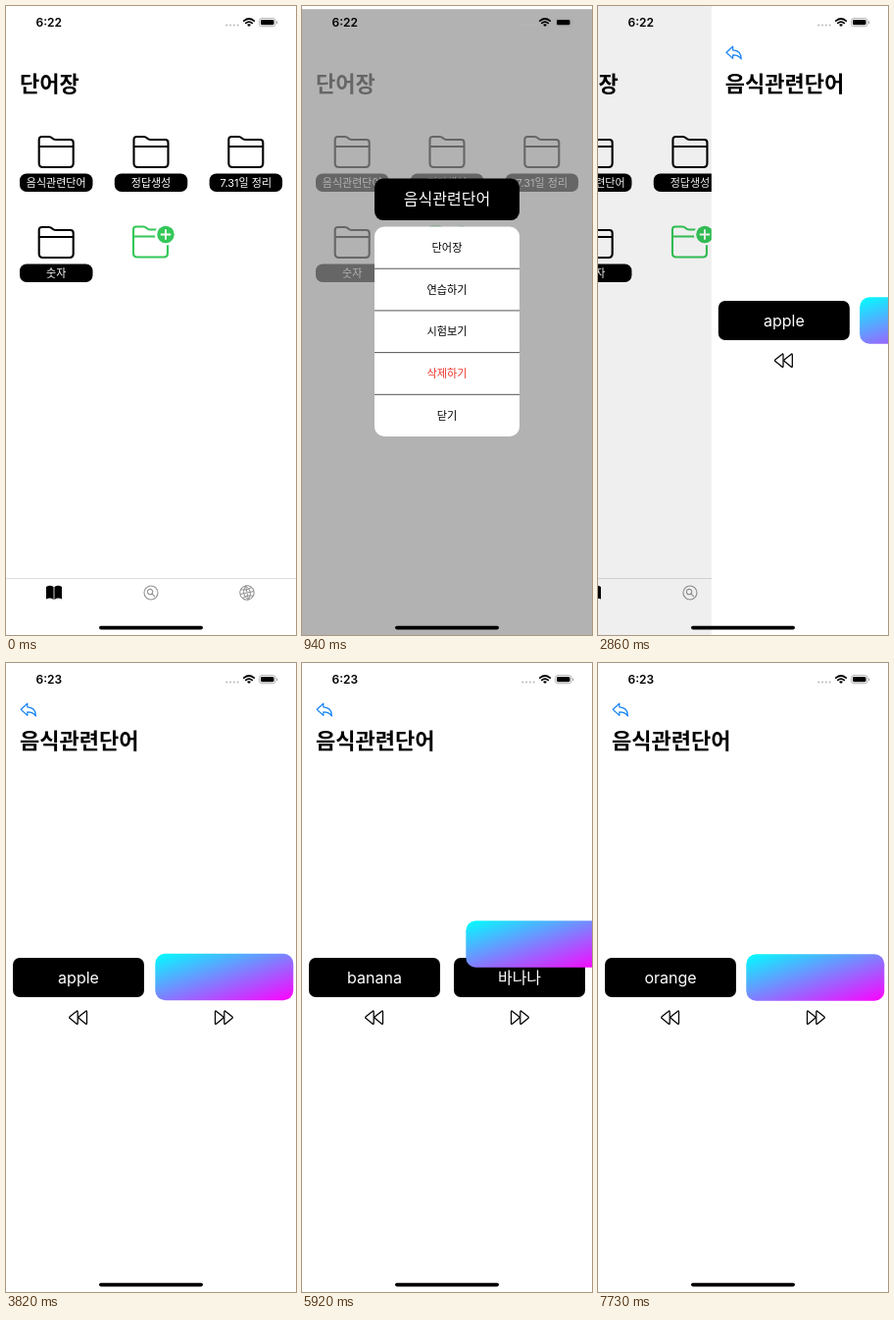
Animation of 296 by 640 pixels, one loop 8 s. Source, as an HTML page with a canvas:

```html
<!DOCTYPE html>
<html lang="ko">
<head>
<meta charset="utf-8">
<style>
  html, body { margin: 0; width: 100%; height: 100%; overflow: hidden; background: #fff; }
  canvas { display: block; width: 296px; height: 640px; }
</style>
</head>
<body>
<canvas id="stage" width="296" height="640"></canvas>
<script>
const W = 296, H = 640, LOOP = 8000;
const ctx = document.getElementById('stage').getContext('2d');
const FONT = 'Inter, "Noto Sans CJK KR", "Noto Sans CJK", sans-serif';

// The screen updates in bursts: [first, last, updates]
const bursts = [
  [0, 0, 1], [500, 940, 5], [1840, 1840, 1], [2100, 2100, 1], [2210, 2420, 3],
  [2750, 3190, 5], [3820, 4030, 3], [4340, 4450, 2], [4730, 5280, 6],
  [5400, 5510, 2], [5810, 6030, 3], [6230, 6790, 6], [6900, 7010, 2],
  [7120, 7120, 1], [7630, 7730, 2]
];
const updates = bursts.flatMap(([a, b, n]) =>
  Array.from({ length: n }, (_, i) => n > 1 ? a + (b - a) * i / (n - 1) : a));
const lastUpdate = t => updates.filter(u => u <= t + 0.5).pop();

const OPEN = 445, CLOSE = 2086, PUSH = 2723;
const SLIDES = [4791, 6301], SLIDE_MS = 300, SLIDE_X = 150;
const WORDS = [['apple', '사과'], ['banana', '바나나'], ['orange', '오렌지']];

// Cover drag: [time, dx, dy]
const drag = [
  [3710, 0, 0], [3820, 1, -0.5], [3925, 10, -20], [4030, 16, -38],
  [4230, 16, -38], [4340, 8, -18], [4450, 0, 0],
  [5700, 0, 0], [5810, 8, -20], [5920, 16, -34], [6030, 8, -17], [6230, 0, 0],
  [6900, 0, 0], [7010, 1, -3], [7120, 16, -40], [7520, 16, -40], [7630, 7, -17], [7730, 0, 0]
];

const spring = ms => {
  const x = Math.max(0, ms) * 0.015;
  return 1 - (1 + x) * Math.exp(-x);
};
const easeInOut = p => p < 0.5 ? 2 * p * p : 1 - 2 * (1 - p) ** 2;
const clamp01 = x => Math.min(1, Math.max(0, x));

function dragAt(t) {
  const i = drag.findIndex(k => k[0] > t);
  if (i < 1) return [0, 0];
  const [t0, x0, y0] = drag[i - 1], [t1, x1, y1] = drag[i];
  const p = (t - t0) / (t1 - t0);
  return [x0 + (x1 - x0) * p, y0 + (y1 - y0) * p];
}

function box(x, y, w, h, r, fill) {
  ctx.beginPath();
  ctx.roundRect(x, y, w, h, r);
  ctx.fillStyle = fill;
  ctx.fill();
}

function text(str, x, y, size, color = '#000', align = 'center', weight = 400) {
  ctx.font = `${weight} ${size}px ${FONT}`;
  ctx.textAlign = align;
  ctx.fillStyle = color;
  ctx.fillText(str, x, y + size * 0.36);
}

function line(d, color, width) {
  ctx.strokeStyle = color;
  ctx.lineWidth = width;
  ctx.lineJoin = ctx.lineCap = 'round';
  ctx.stroke(new Path2D(d));
}

function dot(x, y, r, fill) {
  ctx.beginPath();
  ctx.arc(x, y, r, 0, Math.PI * 2);
  ctx.fillStyle = fill;
  ctx.fill();
}

function at(x, y, draw) {
  ctx.save();
  ctx.translate(x, y);
  draw();
  ctx.restore();
}

function folder(x, y, color) {
  at(x, y, () => line(
    'M1 11V4Q1 1 4 1H11Q13 1 14.5 2.5T18 4H33Q36 4 36 7V28Q36 32 32 32H5Q1 32 1 28V11H36', color, 2.1));
}

function homePage() {
  ctx.fillStyle = '#fff';
  ctx.fillRect(0, 0, W, H);
  text('단어장', 14, 79, 22, '#000', 'left', 600);
  ['음식관련단어', '정답생성', '7.31일 정리', '숫자'].forEach((name, i) => {
    const x = 14 + (i % 3) * 96.8, y = 132 + Math.floor(i / 3) * 92;
    folder(x + 18.7, y, '#000');
    box(x, y + 38.5, 74.5, 18.5, 7, '#000');
    text(name, x + 37.2, y + 48, 11, '#fff');
  });
  folder(129, 223.5, '#34c759');
  dot(163, 232.5, 11, '#fff');
  dot(163, 232.5, 8.7, '#34c759');
  line('M158.5 232.5H167.5M163 228V237', '#fff', 1.8);
}

function tabBar() {
  ctx.fillStyle = '#fff';
  ctx.fillRect(0, 582, W, 58);
  ctx.fillStyle = '#dedede';
  ctx.fillRect(0, 582, W, 1);
  ctx.fillStyle = '#000';
  ctx.fill(new Path2D('M41 591Q45 588.5 48.6 591V604Q45 601.5 41 603.5ZM49.4 591Q53 588.5 57 591V603.5Q53 601.5 49.4 604Z'));
  const gray = '#929292';
  at(148, 597, () => {
    line('M-7 0A7 7 0 1 1 7 0A7 7 0 1 1 -7 0M1.2 1.2L3.6 3.6', gray, 1.1);
    line('M-3.6 -.9A2.7 2.7 0 1 1 1.8 -.9A2.7 2.7 0 1 1 -3.6 -.9', gray, 1.1);
  });
  at(246, 597, () => {
    ctx.rotate(-0.2);
    line('M-7.2 0A7.2 7.2 0 1 1 7.2 0A7.2 7.2 0 1 1 -7.2 0H7.2M0 -7.2V7.2', gray, 1);
    line('M0 -7.2Q-7 0 0 7.2Q7 0 0 -7.2M-5.6 -4.3Q0 -1.5 5.6 -4.3M-5.6 4.3Q0 1.5 5.6 4.3', gray, 0.9);
  });
}

function menu(y) {
  at(0, y, () => {
    ctx.fillStyle = 'rgba(146,146,146,.7)';
    ctx.fillRect(0, 0, W, H);
    box(74, 172.3, 148, 42.5, 9, '#000');
    text('음식관련단어', 148, 193.5, 16, '#fff');
    box(74, 221.3, 148, 213.5, 10, '#fff');
    ['단어장', '연습하기', '시험보기', '삭제하기', '닫기'].forEach((label, i) => {
      const top = 221.3 + i * 42.7;
      if (i) {
        ctx.fillStyle = '#555';
        ctx.fillRect(74, top - 0.5, 148, 1);
      }
      text(label, 148, top + 21.4, 11.2, i === 3 ? '#f0352c' : '#000');
    });
  });
}

function skipIcon(x, dir, alpha) {
  at(x, 360.7, () => {
    ctx.globalAlpha = alpha;
    ctx.scale(dir, 1);
    for (const left of [-9, 0.3])
      at(left, 0, () => line('M0 -5.8V5.8Q0 7.4 1.3 6.3L8 .9Q9 0 8 -.9L1.3 -6.3Q0 -7.4 0 -5.8Z', '#000', 1.25));
  });
}

function cover(x, y) {
  const w = 141, h = 47.5, k = w * h / (w * w + h * h);
  const cx = x + w / 2, cy = y + h / 2;
  const g = ctx.createLinearGradient(cx - h * k, cy - w * k, cx + h * k, cy + w * k);
  g.addColorStop(0, '#0ff');
  g.addColorStop(1, '#f0f');
  box(x, y, w, h, 10, g);
}

function wordCard(x, word) {
  box(x, 300, 134, 40, 7, '#000');
  text(word, x + 67, 320.3, 16, '#fff');
}

function practicePage(t) {
  ctx.fillStyle = '#fff';
  ctx.fillRect(0, 0, W, H);
  line('M15.2 47.3L21.8 41.2V44.8C27.5 45 30.4 48.4 30.4 54C28.4 50.8 26 49.9 21.8 49.9V53.4Z', '#1583f5', 1.2);
  text('음식관련단어', 14, 79, 22, '#000', 'left', 600);

  const index = SLIDES.filter(s => t >= s + SLIDE_MS).length;
  let shift = 0, pressed = false;
  for (const s of SLIDES) {
    const out = clamp01((t - s) / SLIDE_MS), back = clamp01((t - s - SLIDE_MS) / SLIDE_MS);
    shift -= SLIDE_X * (easeInOut(out) - easeInOut(back));
    pressed ||= t > s - 75 && t < s + 110;
  }
  wordCard(155, WORDS[index][1]);
  wordCard(7 + shift, WORDS[index][0]);
  const [dx, dy] = dragAt(t);
  cover(151.3 + dx, 296.3 + dy);
  skipIcon(73.5, -1, 1);
  skipIcon(222.5, 1, pressed ? 0.3 : 1);
}

function statusBar(clock) {
  text(clock, 30.5, 16.8, 12, '#000', 'left', 600);
  for (let i = 0; i < 4; i++) dot(225.2 + i * 3.8, 19.6, 1, '#b8b8b8');
  line('M242.8 15.2Q248 10.8 253.2 15.2M244.8 17.4Q248 14.8 251.2 17.4', '#000', 1.7);
  ctx.fillStyle = '#000';
  ctx.fill(new Path2D('M246 19Q248 17.6 250 19L248 21Z'));
  ctx.beginPath();
  ctx.roundRect(258.5, 12.5, 16.5, 8.3, 2.6);
  ctx.strokeStyle = '#aaa';
  ctx.lineWidth = 0.9;
  ctx.stroke();
  box(260, 14, 13.5, 5.3, 1.4, '#000');
  box(276, 15.2, 1.2, 2.8, 0.6, '#aaa');
}

function render(now) {
  const t = lastUpdate(now % LOOP);
  const pushed = spring(t - PUSH);

  if (t < 3820) {
    at(-0.3 * W * pushed, 0, () => {
      homePage();
      if (t >= 500 && t < 2420) menu(H * (1 - spring(t - OPEN) + spring(t - CLOSE)));
      if (t < 500 || t >= 2100) tabBar();
    });
    if (pushed) {
      ctx.fillStyle = `rgba(0,0,0,${0.1 * pushed})`;
      ctx.fillRect(0, 0, W, H);
    }
  }
  if (pushed) at(W * (1 - pushed), 0, () => practicePage(t));

  statusBar(t < 3820 ? '6:22' : '6:23');
  box(95, 630.8, 106, 3.6, 1.8, '#000');
}

function frame() {
  render(performance.now());
  requestAnimationFrame(frame);
}
frame();
</script>
</body>
</html>
```
